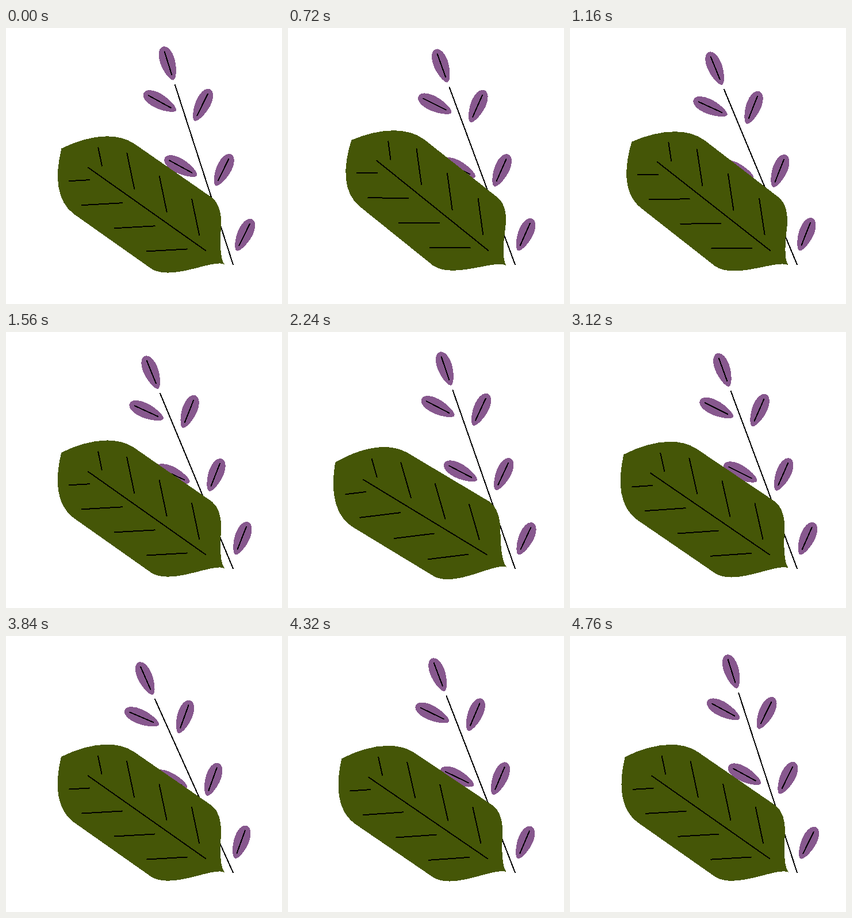
An HTML page for the animation above (4800 ms loop, 480 by 480 pixels).

```html
<!DOCTYPE html>
<html lang="en">
<head>
<meta charset="utf-8">
<title>Swaying leaves</title>
<style>
  html, body { margin: 0; width: 100%; height: 100%; overflow: hidden; background: #fff; }
  svg { display: block; width: 100%; height: 100%; shape-rendering: crispEdges; }
  .line { fill: none; stroke: #000; stroke-width: 2; stroke-linecap: round; }
  .bud { fill: #87588e; }
  .blade { fill: #455607; }
</style>
</head>
<body>
<svg viewBox="0 0 480 480">
  <defs>
    <g id="bud">
      <path class="bud" d="M0 31C-6 31-13 10-13-5C-13-19-8-30 0-30C8-30 13-19 13-5C13 10 6 31 0 31Z"/>
      <path class="line" d="M0-21V21"/>
    </g>
  </defs>
  <g id="sprig">
    <path class="line" d="M294 99L395 411.5"/>
  </g>
  <g id="leaf">
    <path class="blade" d="M96 210C138 189 188 179 222 201L358 295C371 305 375 325 374 345C372 370 372 402 380 411C360 401 290 441 253 419L118 324C88 302 84 260 96 210Z"/>
    <path class="line" d="M142.5 243L347 387M160 208.5l6.5 31.5M110 266.5l35-2"/>
  </g>
</svg>
<script>
const LOOP = 4800;
const sprig = document.getElementById('sprig');
const leaf = document.getElementById('leaf');

function addBud(x, y, turn, stretch = 1) {
  sprig.insertAdjacentHTML('beforeend',
    `<use href="#bud" transform="translate(${x} ${y}) rotate(${turn}) scale(1 ${stretch})"/>`);
}

// One bud at the tip, then pairs down the stem; veins in pairs down the leaf
addBud(282, 61, -17.4);
for (let i = 0; i < 3; i++) {
  addBud(267.3 + 36.5 * i, 128 + 113 * i, -61.3, 1.05);
  addBud(341.7 + 36.5 * i, 133.5 + 113 * i, 26.3);
  const dx = 56.5 * i, dy = 40 * i;
  leaf.insertAdjacentHTML('beforeend',
    `<path class="line" d="M${210 + dx} ${218 + dy}l13 62M${132 + dx} ${308.5 + dy}l70-4"/>`);
}

// Each sway eases between its turning points: [time, degrees]
const sways = [
  { el: sprig, px: 395, py: 411.5, kx: 1.03, ky: 0.82, rest: 17.91, dir: -1,
    turns: [[100, 17.8], [1350, 22.9], [2650, 18.2], [3780, 24.3]] },
  { el: leaf, px: 348.5, py: 405.5, kx: 1.1, ky: 0.96, rest: 35.2, dir: 1,
    turns: [[850, 39], [2300, 31.3], [3520, 35.5], [4450, 34.4]] }
];

function swayAngle(turns, t) {
  const [first, value] = turns[0];
  if (t < first) t += LOOP;
  const cycle = [...turns, [first + LOOP, value]];
  const i = cycle.findIndex(([time]) => time > t);
  const [t0, a0] = cycle[i - 1], [t1, a1] = cycle[i];
  return a0 + (a1 - a0) * (1 - Math.cos(Math.PI * (t - t0) / (t1 - t0))) / 2;
}

function draw(t) {
  for (const { el, px, py, kx, ky, rest, dir, turns } of sways) {
    const angle = dir * (swayAngle(turns, t) - rest) * Math.PI / 180;
    const c = Math.cos(angle), s = Math.sin(angle);
    el.setAttribute('transform',
      `translate(${px} ${py}) matrix(${c} ${ky * s} ${-kx * s} ${c} 0 0) translate(${-px} ${-py})`);
  }
}

const start = performance.now();
function tick() {
  draw((performance.now() - start) % LOOP);
  requestAnimationFrame(tick);
}
tick();
</script>
</body>
</html>
```
